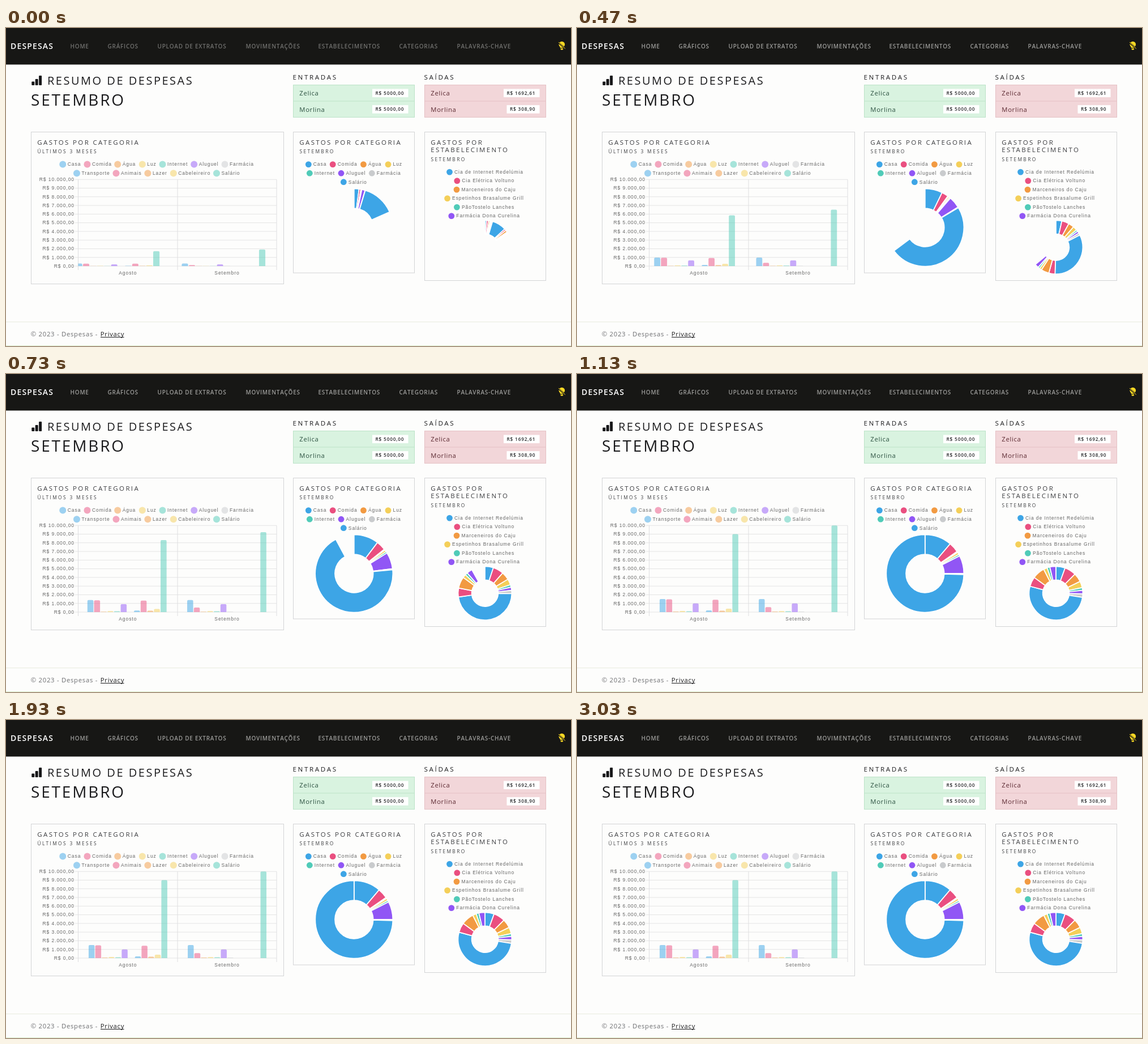
Animation of 998 by 561 pixels, one loop 3060 ms. Source, as an HTML page:

```html
<!DOCTYPE html>
<html lang="pt-BR">
<head>
<meta charset="utf-8">
<title>Despesas</title>
<style>
  html, body { margin: 0; width: 100%; height: 100%; overflow: hidden; background: #fdfdfc; }
  svg { display: block; width: 998px; height: 561px; }
  text { font-family: "Open Sans", "Noto Sans", sans-serif; fill: #1b1b1d; white-space: pre; }
  .brand { font-size: 14px; font-weight: 600; letter-spacing: 1.15px; fill: #fff; }
  .nav { font-size: 10px; font-weight: 600; letter-spacing: .75px; font-kerning: none; fill: #9b9b99; }
  .title { font-size: 20px; font-weight: 500; letter-spacing: 2.5px; }
  .month { font-size: 28px; font-weight: 500; letter-spacing: 2.8px; }
  .section { font-size: 11.6px; font-weight: 500; letter-spacing: 2.65px; }
  .card { font-size: 11.5px; font-weight: 500; letter-spacing: 2.35px; fill: #3c3d40; }
  .sub { font-size: 8.4px; font-weight: 500; letter-spacing: 2.35px; fill: #3c3d40; }
  .person { font-size: 11.3px; letter-spacing: .65px; }
  .value { font-size: 8.3px; font-weight: 600; letter-spacing: .8px; fill: #2a2b2d; }
  .foot { font-size: 11.3px; letter-spacing: .72px; fill: #6c6d70; }
  .chart { font-family: "Liberation Sans", Arial, sans-serif; font-size: 8.5px; letter-spacing: .93px; fill: #666; }
</style>
</head>
<body>
<svg id="stage" viewBox="0 0 998 561"></svg>
<script>
const LOOP = 3060;
const stage = document.getElementById('stage');
const [BLUE, PINK, ORANGE, YELLOW, TEAL, PURPLE, GRAY] =
  ['#3da5e6', '#ea4f80', '#f29a42', '#f4cf59', '#50cbb8', '#9156f5', '#c9cbcd'];
const PALETTE = [BLUE, PINK, ORANGE, YELLOW, TEAL, PURPLE, GRAY];
const color = i => PALETTE[i % 7];

function add(tag, attrs, parent = stage) {
  const node = document.createElementNS('http://www.w3.org/2000/svg', tag);
  for (const key in attrs) node.setAttribute(key, attrs[key]);
  parent.appendChild(node);
  return node;
}
function rect(x, y, width, height, fill, stroke = 'none') {
  return add('rect', { x, y, width, height, fill, stroke });
}
function line(x1, y1, x2, y2, stroke) {
  return add('line', { x1, y1, x2, y2, stroke });
}
function label(x, y, cls, content, extra = {}) {
  const node = add('text', { x, y, class: cls, ...extra });
  node.textContent = content;
  return node;
}

// Header
rect(0, 0, 998, 64.5, '#171715');
label(8, 36.6, 'brand', 'DESPESAS');
const navLinks = [
  [114, 'HOME'], [180, 'GRÁFICOS'], [268, 'UPLOAD DE EXTRATOS'], [424, 'MOVIMENTAÇÕES'],
  [552, 'ESTABELECIMENTOS'], [695, 'CATEGORIAS'], [797, 'PALAVRAS-CHAVE']
].map(([x, name]) => label(x - .5, 35.5, 'nav', name));
add('path', { d: 'M976.5 29a5.3 5.3 0 0 1 10.6 0c0 3-2.3 3.6-2.5 6h-5.6c-.2-2.4-2.5-3-2.5-6zM979.3 36h5l-.8 2.5h-3.4z', fill: '#fcd924' });
add('path', { d: 'M975.5 25.5l12.5 11', stroke: '#171715', 'stroke-width': 2.4 });
add('path', { d: 'M976 25l11.8 11.5', stroke: '#fcd924', 'stroke-width': 1 });

// Headings
[[45.3, 94.5], [51.7, 90], [58.1, 84]].forEach(([x, y]) =>
  add('rect', { x, y, width: 5, height: 101 - y, rx: 1, fill: '#161618' }));
label(73, 99.5, 'title', 'RESUMO DE DESPESAS');
label(44, 137, 'month', 'SETEMBRO');

function summary(x, title, fill, border, ink, rows) {
  label(x - .5, 91.3, 'section', title);
  rect(x + .5, 100.5, 214, 57, fill, border);
  line(x, 129, x + 215, 129, border);
  rows.forEach(([name, value, width], i) => {
    const y = 114.7 + i * 28.6;
    label(x + 11.3, y + 4.2, 'person', name, { style: `fill:${ink}` });
    rect(x + 203.5 - width, y - 7.2, width, 14.6, '#fff');
    label(x + 209 - width, y + 3, 'value', value);
  });
}
summary(507, 'ENTRADAS', '#d9f3e0', '#bce3c8', '#2c5140',
  [['Zelica', 'R$ 5000,00', 63.5], ['Morlina', 'R$ 5000,00', 63.5]]);
summary(739, 'SAÍDAS', '#f2d6d9', '#e5c0c4', '#5b2931',
  [['Zelica', 'R$ 1692,61', 63.5], ['Morlina', 'R$ 308,90', 58]]);

// Cards
function card(x, width, height, titles, sub) {
  rect(x + .5, 183.5, width, height, '#fdfdfc', '#d3d4d6');
  titles.forEach((title, i) => label(x + 11.3, 205.6 + i * 13.2, 'card', title));
  label(x + 11.5, 221.3 + (titles.length - 1) * 13.4, 'sub', sub);
}
card(44, 446, 268, ['GASTOS POR CATEGORIA'], 'ÚLTIMOS 3 MESES');
card(507, 214, 248.5, ['GASTOS POR CATEGORIA'], 'SETEMBRO');
card(739, 214, 262, ['GASTOS POR', 'ESTABELECIMENTO'], 'SETEMBRO');

function legend(rows, radius, opacity) {
  let index = 0;
  rows.forEach(([y, ...items]) => items.forEach(([x, name]) => {
    add('circle', { cx: x, cy: y + .4, r: radius, fill: color(index++), opacity });
    label(x + 8.5, y + 3.2, 'chart', name);
  }));
}
legend([
  [240.2, [100.3, 'Casa'], [143.5, 'Comida'], [197.2, 'Água'], [240.8, 'Luz'], [276.5, 'Internet'], [332.2, 'Aluguel'], [386.5, 'Farmácia']],
  [255.8, [125, 'Transporte'], [194.5, 'Animais'], [250.4, 'Lazer'], [295.8, 'Cabeleireiro'], [372, 'Salário']]
], 6, .5);
legend([
  [240.2, [534.3, 'Casa'], [577.2, 'Comida'], [631.4, 'Água'], [675, 'Luz']],
  [255.8, [536.3, 'Internet'], [592, 'Aluguel'], [646.3, 'Farmácia']],
  [271.3, [596.3, 'Salário']]
], 5.4, 1);
legend([
  [253.7, [783.5, 'Cia de Internet Redelúmia']],
  [269.2, [796.8, 'Cia Elétrica Voltuno']],
  [284.7, [796, 'Marceneiros do Caju']],
  [300.2, [779.6, 'Espetinhos Brasalume Grill']],
  [315.7, [796.4, 'PãoTostelo Lanches']],
  [331.2, [786.8, 'Farmácia Dona Curelina']]
], 5.4, 1);

// Bar chart
const BASE = 420, LEFT = 127.5, RIGHT = 478, STEP = 15.28;
for (let i = 0; i <= 10; i++) {
  const y = BASE - i * STEP;
  line(122, y, RIGHT, y, '#e4e4e4');
  label(121, y + 2.8, 'chart', `R$ ${i ? i + '.000' : '0'},00`, { 'text-anchor': 'end' });
}
[LEFT, 303, RIGHT].forEach(x => line(x, BASE - 10 * STEP, x, 427, '#dedee0'));
label(215.3, 435.4, 'chart', 'Agosto', { 'text-anchor': 'middle' });
label(390.5, 435.4, 'chart', 'Setembro', { 'text-anchor': 'middle' });

const clip = add('clipPath', { id: 'plot' });
add('rect', { x: LEFT, y: 260, width: RIGHT - LEFT, height: 160.5 }, clip);
const plot = add('g', { 'clip-path': 'url(#plot)', opacity: .5 });
const AUGUST = [1500, 1470, 60, 130, 100, 1000, 0, 190, 1430, 170, 390, 9000];
const SEPTEMBER = [1500, 570, 60, 120, 100, 1000, 60, 0, 0, 0, 0, 10000];
const bars = [AUGUST, SEPTEMBER].flatMap((values, group) => values.map((value, i) => ({
  value,
  center: 151.2 + group * 175.1 + i * 11.68,
  offset: 27.3 - group * 14.6 - i * .9,
  node: add('path', { fill: color(i) }, plot)
})).filter(bar => bar.value));

function drawBar({ value, center, offset, node }, p) {
  const width = 11.3 - .8 * p;
  const height = value / 1000 * STEP * p;
  const x = center - offset * (1 - p) - width / 2;
  const r = Math.min(2, height);
  node.setAttribute('d', `M${x} ${BASE}v${r - height}q0 ${-r} ${r} ${-r}h${width - 2 * r}q${r} 0 ${r} ${r}V${BASE}z`);
}

// Doughnut charts
function doughnut(cx, cy, outer, inner, values, colors) {
  const total = values.reduce((a, b) => a + b);
  let sum = 0;
  const slices = values.map((value, i) => {
    const from = sum / total;
    sum += value;
    return { from, to: sum / total, node: add('path', { fill: colors[i], stroke: '#fff', 'stroke-width': 1.7 }) };
  });
  const point = (turn, r) => {
    const a = turn * 2 * Math.PI;
    return `${cx + r * Math.sin(a)} ${cy - r * Math.cos(a)}`;
  };
  return p => slices.forEach(({ from, to, node }) => {
    const a = from * p, b = to * p, large = b - a > .5 ? 1 : 0;
    node.setAttribute('d', `M${point(a, outer)}A${outer} ${outer} 0 ${large} 1 ${point(b, outer)}` +
      `L${point(b, inner)}A${inner} ${inner} 0 ${large} 0 ${point(a, inner)}z`);
  });
}
const drawCategories = doughnut(614.8, 352, 68.5, 33.8, SEPTEMBER.filter(v => v), [...PALETTE, BLUE]);
const drawShops = doughnut(846, 386.7, 47.4, 23.4,
  [20, 25, 19, 14, 6, 7.5, 7.5, 186, 21, 27, 8, 6, 13],
  [...PALETTE, ...PALETTE.slice(0, 6)]);

// Footer
line(0, 518.5, 998, 518.5, '#e9ecdf');
label(43.8, 543.5, 'foot', '© 2023 - Despesas - ');
label(166.8, 543.5, 'foot', 'Privacy', { style: 'fill:#1b1b1d' });
line(167, 545.5, 208.5, 545.5, '#1b1b1d');
line(0, 560.5, 998, 560.5, '#def0d0');

// Chart clock from 0 to 1: slowed while the page is busy, then real time.
function clock(t) {
  return t < 510 ? 1 - (.81 - t * .00098) ** .25 : .472 + (t - 730) / 1000;
}
const easeOutQuart = x => 1 - (1 - Math.min(1, x)) ** 4;

function render(t) {
  const x = clock(t);
  const grown = easeOutQuart(x);
  bars.forEach(bar => drawBar(bar, grown));
  // Each doughnut starts slightly after the chart before it.
  drawCategories(easeOutQuart(x - .002));
  drawShops(easeOutQuart(x - .007));
  const shade = Math.round(112 + 43 * Math.min(1, t / 120));
  navLinks.forEach(link => { link.style.fill = `rgb(${shade},${shade},${shade - 2})`; });
}

const start = performance.now();
function tick() {
  render((performance.now() - start) % LOOP);
  requestAnimationFrame(tick);
}
render(0);
requestAnimationFrame(tick);
</script>
</body>
</html>
```
